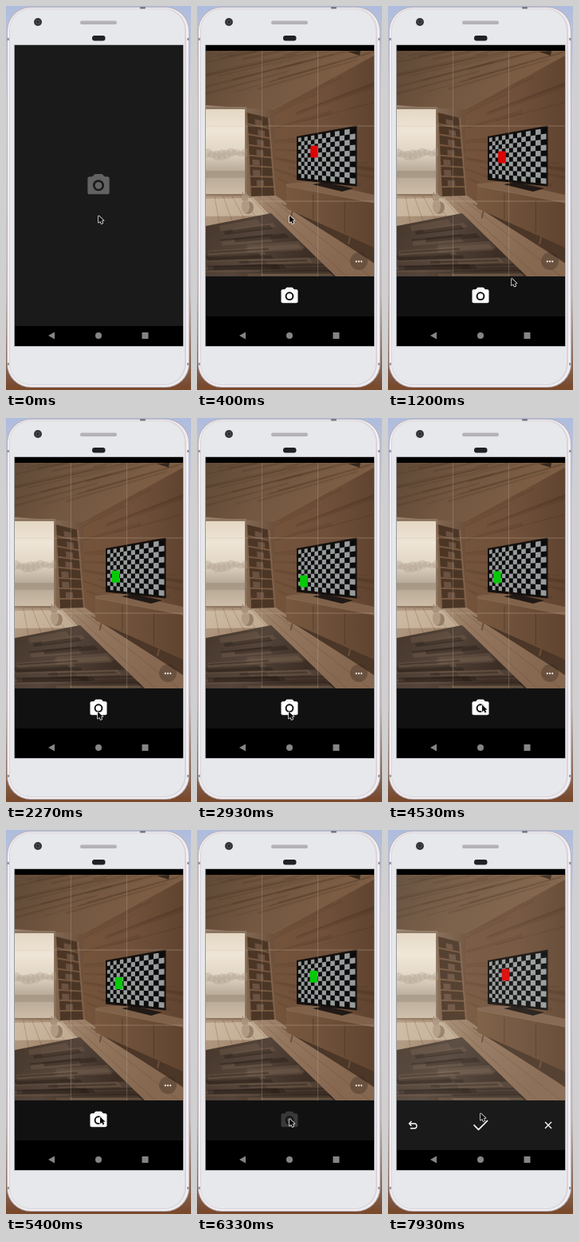
Animation of 232 by 480 pixels, one loop 8000 ms. Source, as an HTML page with a canvas:

```html
<!DOCTYPE html>
<html lang="en">
<head>
<meta charset="utf-8">
<title>Phone camera</title>
<style>
html, body { margin: 0; width: 100%; height: 100%; overflow: hidden; background: #d9d9de; }
canvas { display: block; width: 232px; height: 480px; }
</style>
</head>
<body>
<canvas id="stage"></canvas>
<script>
const W = 232, H = 480, LOOP = 8000;
const SCREEN = { x: 11, y: 49, w: 211, h: 376 };
const VIEW = { y: 56, h: 282 };
const READY = 400, BOUNCE = 3440, SHUTTER = 6130, FREEZE = 6600, REVIEW = 7330;

const canvas = document.getElementById('stage');
const dpr = window.devicePixelRatio || 1;
canvas.width = W * dpr;
canvas.height = H * dpr;
const c = canvas.getContext('2d');
c.scale(dpr, dpr);

const mix = (a, b, k) => a + (b - a) * k;
const clamp = v => Math.max(0, Math.min(1, v));
const random = n => {
  const v = Math.sin(n * 127.1 + 3.7) * 43758.5453;
  return v - Math.floor(v);
};

function trace(points) {
  c.beginPath();
  for (const [x, y] of points) c.lineTo(x, y);
}
function poly(fill, ...points) {
  c.fillStyle = fill;
  trace(points);
  c.fill();
}
function line(color, width, ...points) {
  c.strokeStyle = color;
  c.lineWidth = width;
  trace(points);
  c.stroke();
}
function rect(fill, x, y, w, h, r = 0) {
  c.fillStyle = fill;
  c.beginPath();
  c.roundRect(x, y, w, h, r);
  c.fill();
}
function oval(fill, x, y, rx, ry = rx) {
  c.fillStyle = fill;
  c.beginPath();
  c.ellipse(x, y, rx, ry, 0, 0, 7);
  c.fill();
}
function grad(x0, y0, x1, y1, ...colors) {
  const g = c.createLinearGradient(x0, y0, x1, y1);
  colors.forEach((color, i) => g.addColorStop(i / (colors.length - 1), color));
  return g;
}

// A surface in the room: maps (u, v) in 0..1 to the stage; depth is the size ratio right to left
function plane(tl, tr, br, bl, depth = 1) {
  return (u, v) => {
    const k = u / (u + (1 - u) * depth);
    return [0, 1].map(i => mix(mix(tl[i], tr[i], k), mix(bl[i], br[i], k), v));
  };
}
function face(p, fill, u0 = 0, v0 = 0, u1 = 1, v1 = 1) {
  poly(fill, p(u0, v0), p(u1, v0), p(u1, v1), p(u0, v1));
}
function grain(p, color, count, length, thick, seed) {
  for (let i = 0; i < count; i++) {
    const u = random(seed + i) * (1 - length / 2) - length / 4, v = random(seed + i + 0.5);
    face(p, color, Math.max(0, u), v, Math.min(1, u + length), Math.min(1, v + thick * random(seed - i)));
  }
}

const corner = [97, 130], base = [98, 236];
const ceiling = plane([11, 56], [222, 20], [222, 62], [11, 125]);
const leftWall = plane([11, 124], corner, base, [11, 238]);
const rightWall = plane(corner, [222, 62], [222, 325], base, 1.6);
const floor = plane([11, 238], base, [246, 338], [11, 338]);
const rug = plane([11, 275], [93, 259], [174, 338], [11, 338]);
const ladder = plane([62, 133], [90, 140], [98, 237], [67, 238]);
const cabinet = plane([112, 225], [222, 246], [222, 302], [112, 253], 1.5);
const bezel = plane([125, 163], [200.5, 149.5], [200.5, 225.5], [125, 217.5]);
const panel = plane([127, 165], [198.5, 152.5], [198.5, 222.5], [127, 214.5], 1.4);

function phone() {
  c.fillStyle = grad(0, 0, 0, H, '#aebcdd', '#d2d0d8', '#cfccd2', '#c4bbbd', '#74462b');
  c.fillRect(0, 0, W, H);
  rect('#7a4a2d', 0, 474, W, 6);
  rect('#b9b1b8', 1, 1, 229, 476, 30);
  rect('#f1eef2', 2, 2, 227, 474, 29);
  rect('#dad5da', 4, 3, 222, 471, 27);
  rect('#e7e8eb', 5, 4, 219, 469, 26);
  for (const y of [40, 446])
    for (const x of [1, 227]) rect('#9c99a0', x, y, 3, 3);
  rect('#777886', 168, 1, 7, 2.5, 1);
  oval('#35363b', 40, 20, 5);
  oval('#5b5c63', 40, 20, 2.3);
  oval('#17181c', 40, 20, 1.4);
  rect('#b3b2b8', 93, 18.5, 46, 4.5, 2);
  rect('#202126', 108, 37, 16.5, 6.5, 3);
  rect('#77777d', 10.3, 48.4, 212.2, 377.2);
}

function backdrop(color) {
  rect(color, SCREEN.x, SCREEN.y, SCREEN.w, SCREEN.h);
}

function nav(top) {
  rect('#000', SCREEN.x, top, SCREEN.w, SCREEN.y + SCREEN.h - top);
  poly('#858585', [53, 412], [61, 407.5], [61, 416.5]);
  oval('#858585', 116, 412, 4);
  rect('#858585', 170.5, 408, 8, 8);
}

function camera(x, y, s, color, hole) {
  c.save();
  c.translate(x, y);
  c.scale(s, s);
  rect(color, -10.5, -7.5, 21, 17, 2);
  poly(color, [-6.5, -7], [-3.5, -10], [3.5, -10], [6.5, -7]);
  oval(hole, 0, 1, 5.4);
  oval(color, 0, 1, 3.4);
  c.restore();
}

function windowPane() {
  rect('#8b7561', 11, 126, 51, 110);
  rect(grad(0, 129, 0, 235, '#e4d7c4', '#efe5d6', '#e2d6c5', '#b5a694', '#cdbda8'), 11, 129, 49, 106);
  for (let i = 0; i < 9; i++)
    oval('rgba(165,150,133,.3)', 13 + i * 6, 183 + random(i) * 5, 6, 3 + random(i + 9) * 4);
  rect('rgba(140,124,107,.35)', 11, 206, 49, 9);
}

function shelves() {
  face(ladder, '#4b3626');
  for (let i = 1; i < 8; i++) {
    const v = i / 8, u = 0.15 + random(i) * 0.4;
    face(ladder, '#6b5140', u, v - 0.07, u + 0.3, v);
    face(ladder, '#785940', 0, v, 1, v + 0.02);
  }
  line('#80614a', 2.2, ladder(0, 0), ladder(0, 1));
  line('#80614a', 2.2, ladder(1, 0), ladder(1, 1));
}

function cat() {
  oval('#957d66', 64, 252, 7, 8);
  oval('#b09a83', 61, 250, 5, 9);
  oval('#a9937c', 60, 239.5, 4.5);
  for (const x of [56, 60]) poly('#a08972', [x, 238], [x + 1, 232], [x + 4, 237]);
}

function room() {
  rect(grad(11, 56, 150, 130, '#5f4936', '#735741', '#7c5d44'), 11, 56, 211, 282);
  grain(ceiling, 'rgba(40,25,14,.13)', 34, 0.6, 0.05, 10);
  face(leftWall, grad(11, 0, 98, 0, '#a18a73', '#6b4f3a'));
  face(rightWall, grad(98, 0, 222, 0, '#74533b', '#70503a', '#604430'));
  grain(rightWall, 'rgba(45,26,14,.1)', 26, 0.7, 0.03, 60);
  poly('#38291d', [189, 57], [205, 56], [204, 62]);
  windowPane();

  face(floor, grad(11, 238, 170, 338, '#b59d85', '#94775e', '#866750'));
  face(floor, 'rgba(236,221,198,.45)', 0, 0.03, 0.65, 0.25);
  for (let i = 1; i < 9; i++) line('rgba(75,50,34,.3)', 0.8, floor(i / 8, 0), floor(i / 8, 1));
  face(rug, grad(11, 262, 120, 338, '#46372c', '#54443a', '#3c2e25'));
  grain(rug, 'rgba(128,106,88,.3)', 16, 0.55, 0.13, 110);
  grain(rug, 'rgba(30,21,15,.35)', 12, 0.6, 0.1, 150);
  shelves();
  cat();

  poly('#4b3627', [104, 246], [112, 250], [222, 300], [222, 321]);
  poly('#80624a', [112, 222], [145, 219], [222, 236], [222, 246], [112, 225]);
  face(cabinet, grad(112, 0, 222, 0, '#78593f', '#6d4f39', '#60442f'));
  line('#8e6e53', 0.8, cabinet(0, 0), cabinet(1, 0));
  for (const u of [0.4, 0.75]) line('#4c3525', 0.7, cabinet(u, 0.1), cabinet(u, 0.95));
  for (const u of [0.1, 0.8]) {
    const [x, y] = cabinet(u, 1);
    line('#6c4f39', 2, [x, y], [x - 2, y + 9]);
  }
}

function television() {
  const cols = 14, rows = 10;
  poly('#211915', [145, 223], [160, 220], [196, 228], [182, 232]);
  face(bezel, '#15110e');
  face(panel, '#0b0b0b');
  for (let i = 0; i < cols; i++)
    for (let j = i % 2; j < rows; j += 2)
      face(panel, '#979b9c', i / cols, j / rows, (i + 1) / cols, (j + 1) / rows);
}

// The block slides down to the corner of the television and back up
function block(t) {
  const away = Math.abs(Math.min(t, FREEZE) - BOUNCE);
  const x = 131 + away * 0.0052, y = 208.5 - away * 0.0087;
  const red = t < BOUNCE / 2 || t > 6450;
  rect(red ? '#dc0404' : '#06c906', x - 4.5, y - 7.5, 9.5, 15, 1.5);
}

function picture(t) {
  c.save();
  c.beginPath();
  c.rect(SCREEN.x, VIEW.y, SCREEN.w, VIEW.h);
  c.clip();
  room();
  television();
  block(t);
  c.restore();
}

function splash() {
  backdrop('#1a1a1a');
  nav(400);
  camera(116, 223, 1.3, '#626262', '#1a1a1a');
}

function preview(t) {
  backdrop('#000');
  picture(t);
  for (const k of [1 / 3, 2 / 3]) {
    rect('rgba(205,185,165,.35)', SCREEN.x + SCREEN.w * k - 0.4, VIEW.y, 0.8, VIEW.h);
    rect('rgba(205,185,165,.35)', SCREEN.x, VIEW.y + VIEW.h * k - 0.4, SCREEN.w, 0.8);
  }
  oval('rgba(45,32,25,.3)', 203, 319, 11);
  for (const dx of [-3.2, 0, 3.2]) oval('#fff', 203 + dx, 319.3, 1.1);
  rect('#111', SCREEN.x, 338, SCREEN.w, 50);
  nav(388);
  camera(116, 361.7, 1, t > SHUTTER ? '#393939' : '#fff', '#111');
}

function review(t) {
  backdrop('#000');
  picture(t);
  rect('rgba(255,240,225,.06)', SCREEN.x, VIEW.y, SCREEN.w, VIEW.h);
  rect('#1a1a1a', SCREEN.x, 338, SCREEN.w, 62);
  nav(400);
  line('#fff', 1.7, [107.5, 368.5], [113.5, 374.5], [125, 363]);
  for (const d of [-4, 4]) line('#fff', 1.3, [201 - d, 365], [201 + d, 373]);
  line('#fff', 1.3, [29.5, 364], [26.5, 367], [29.5, 370]);
  c.beginPath();
  c.moveTo(27, 367);
  c.arc(33, 370, 3, -Math.PI / 2, Math.PI / 2);
  c.lineTo(28, 373);
  c.stroke();
}

const MOVES = [
  { from: 550, to: 1200, x: 155, y: 340.5 },
  { from: 1200, to: 1800, x: 115, y: 367 },
  { from: 2950, to: 3300, x: 118, y: 358.5 },
  { from: 5930, to: SHUTTER, x: 116, y: 361 },
  { from: 7800, to: 7930, x: 116, y: 354 },
];
function pointer(t) {
  let x = 116, y = 262;
  for (const m of MOVES) {
    const k = clamp((t - m.from) / (m.to - m.from));
    x = mix(x, m.x, k);
    y = mix(y, m.y, k);
  }
  c.save();
  c.translate(x, y);
  c.scale(0.88, 0.88);
  c.lineJoin = 'round';
  const arrow = [[0, 0], [0, 10], [2.4, 8], [4.1, 11.5], [6, 10.6], [4.4, 7.2], [7.5, 7]];
  line('#fff', 1.6, ...arrow, arrow[0]);
  poly('#080808', ...arrow);
  c.restore();
}

function draw(t) {
  phone();
  if (t < READY) splash();
  else preview(t);
  if (t >= REVIEW) {
    c.globalAlpha = clamp((t - REVIEW + 67) / 267);
    review(t);
    c.globalAlpha = 1;
  }
  pointer(t);
}

let start;
function tick(now) {
  start ??= now;
  draw((now - start) % LOOP);
  requestAnimationFrame(tick);
}
draw(0);
requestAnimationFrame(tick);
</script>
</body>
</html>
```
